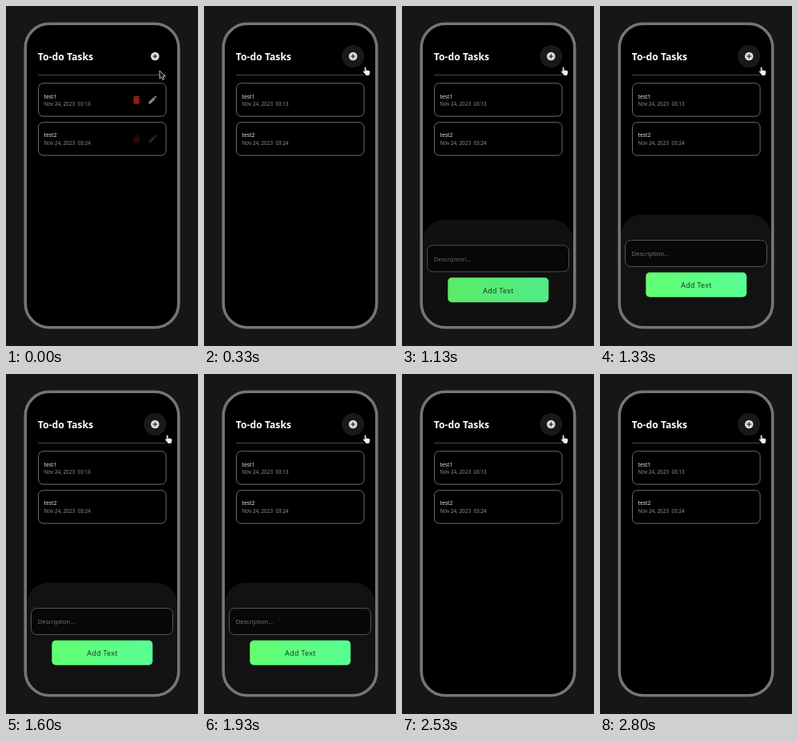
Recreate the animation shown at these times as an HTML page. Size 240 by 426 pixels, loop 2.87 s.

```html
<!DOCTYPE html>
<html lang="en">
<head>
<meta charset="utf-8">
<title>To-do Tasks</title>
<style>
  html, body { margin: 0; width: 100%; height: 100%; overflow: hidden; background: #161618; }
  svg { display: block; width: 100vw; height: 100vh; }
  text { font-family: "Open Sans", "Noto Sans", sans-serif; white-space: pre; }
  .title { font-size: 12.2px; font-weight: 700; fill: #fff; }
  .name { font-size: 6.9px; fill: #f2f2f2; }
  .date { font-size: 6.4px; fill: #999; }
  .hint { font-size: 7.6px; fill: #7c7c7c; }
  .label { font-size: 8.9px; letter-spacing: .35px; fill: #16301c; }
  .box { fill: #000; stroke: #6c6c6c; }
</style>
</head>
<body>
<svg viewBox="0 0 240 426">
  <defs>
    <clipPath id="screen"><rect x="25.5" y="23.5" width="189" height="378" rx="29"/></clipPath>
    <linearGradient id="green">
      <stop stop-color="#62ff70"/><stop offset="1" stop-color="#58ff94"/>
    </linearGradient>
    <g id="icons">
      <path d="M159 113.4h2.2l.7-.9h2.4l.7.9h2.2v1.3h-8.2zM159.6 115.5h7v6.1q0 1-1 1h-5q-1 0-1-1z" fill="#a8281c"/>
      <path d="M161.9 117v4M164.3 117v4" stroke="#300" stroke-width=".6"/>
      <path d="M178.4 122.4v-2.2l6-6 2.2 2.2-6 6zM185 113.6l.9-.9q.5-.5 1 0l1.2 1.2q.5.5 0 1l-.9.9z" fill="#8a8a8f"/>
    </g>
  </defs>
  <rect width="240" height="426" fill="#161618"/>
  <rect x="24.2" y="22.2" width="191.6" height="380.6" rx="30" fill="#000"/>

  <text class="title" x="39.8" y="68">To-do Tasks</text>
  <circle id="halo" cx="186.3" cy="63" r="14" fill="#19191b"/>
  <circle cx="186.3" cy="63" r="5.3" fill="#dcdcdc"/>
  <path d="M183.5 63h5.6M186.3 60.2v5.6" stroke="#111" stroke-width="1.1"/>
  <path d="M40 86.5h160" stroke="#484848"/>

  <rect class="box" x="40.5" y="96.8" width="159.6" height="41.4" rx="6"/>
  <text class="name" x="47.5" y="115.6">test1</text>
  <text class="date" x="47.5" y="125.3">Nov 24, 2023  03:13</text>
  <use id="icons1" href="#icons"/>

  <rect class="box" x="40.5" y="145.8" width="159.6" height="41.4" rx="6"/>
  <text class="name" x="47.5" y="164.4">test2</text>
  <text class="date" x="47.5" y="174.2">Nov 24, 2023  03:24</text>
  <use id="icons2" href="#icons" y="49"/>

  <g clip-path="url(#screen)">
    <g id="panel">
      <rect x="26" y="261.5" width="188" height="180" rx="26" fill="#121213"/>
      <rect x="31.5" y="293.5" width="177" height="33" rx="7" fill="#080809" stroke="#555"/>
      <text class="hint" x="39.7" y="313.2">Description...</text>
      <rect x="57.3" y="333.8" width="126" height="31" rx="5" fill="url(#green)"/>
      <text class="label" x="101.2" y="353.3">Add Text</text>
    </g>
  </g>
  <rect x="24.2" y="22.2" width="191.6" height="380.6" rx="30" fill="none" stroke="#757575" stroke-width="3.6"/>

  <path id="arrow" d="M0 0v10l2.3-2.1 1.6 3.6 1.8-.8-1.6-3.5h3.1z" fill="#111" stroke="#e6e6e6" stroke-width=".8"/>
  <path id="hand" d="M-.3 .6q0-1 .9-1t1 1v2.9q1.1-.5 1.7.2 1.1-.4 1.6.4 1.5-.2 1.5 1.1v1.5q0 1.3-.8 2.3v1.1h-4.6v-1l-2.9-3.4q-.5-1 .3-1.3.6-.2 1.3.7z" fill="#f2f2f2" stroke="#333" stroke-width=".4"/>
</svg>
<script>
const LOOP = 2870, STEP = 1000 / 15, SLIDE = 80;
const $ = id => document.getElementById(id);
const ramp = (t, start, length) => Math.min(1, Math.max(0, (t - start) / length));

// cubic-bezier(.25, .1, .25, 1)
function ease(x) {
  if (x <= 0 || x >= 1) return x;
  const curve = (a, b, u) => 3 * a * u * (1 - u) ** 2 + 3 * b * u * u * (1 - u) + u ** 3;
  let low = 0, high = 1;
  for (let i = 0; i < 24; i++) {
    const mid = (low + high) / 2;
    if (curve(.25, .25, mid) < x) low = mid; else high = mid;
  }
  return curve(.1, 1, low);
}

const fade = (id, value) => $(id).setAttribute("opacity", value);
const move = (id, x, y) => $(id).setAttribute("transform", `translate(${x} ${y})`);

function draw(now) {
  const t = Math.floor((now % LOOP + 5) / STEP) * STEP;
  const glide = ease(ramp(t, 0, 200));
  const over = t >= 130;
  const x = 192 + 9 * glide, y = 81 - 4 * glide;
  move("arrow", x, y);
  move("hand", x, y);
  fade("arrow", over ? 0 : 1);
  fade("hand", over ? 1 : 0);
  fade("halo", ease(ramp(t, 100, 230)));
  fade("icons1", 1 - ease(ramp(t, 0, 250)));
  fade("icons2", .28 * (1 - ramp(t, 0, 130)));

  const open = ease(ramp(t, 870, 400)) * (1 - ease(ramp(t, 2115, 400)));
  move("panel", 0, SLIDE * (1 - open));
  fade("panel", open);
}

const start = performance.now();
function tick() {
  draw(performance.now() - start);
  requestAnimationFrame(tick);
}
tick();
</script>
</body>
</html>
```
